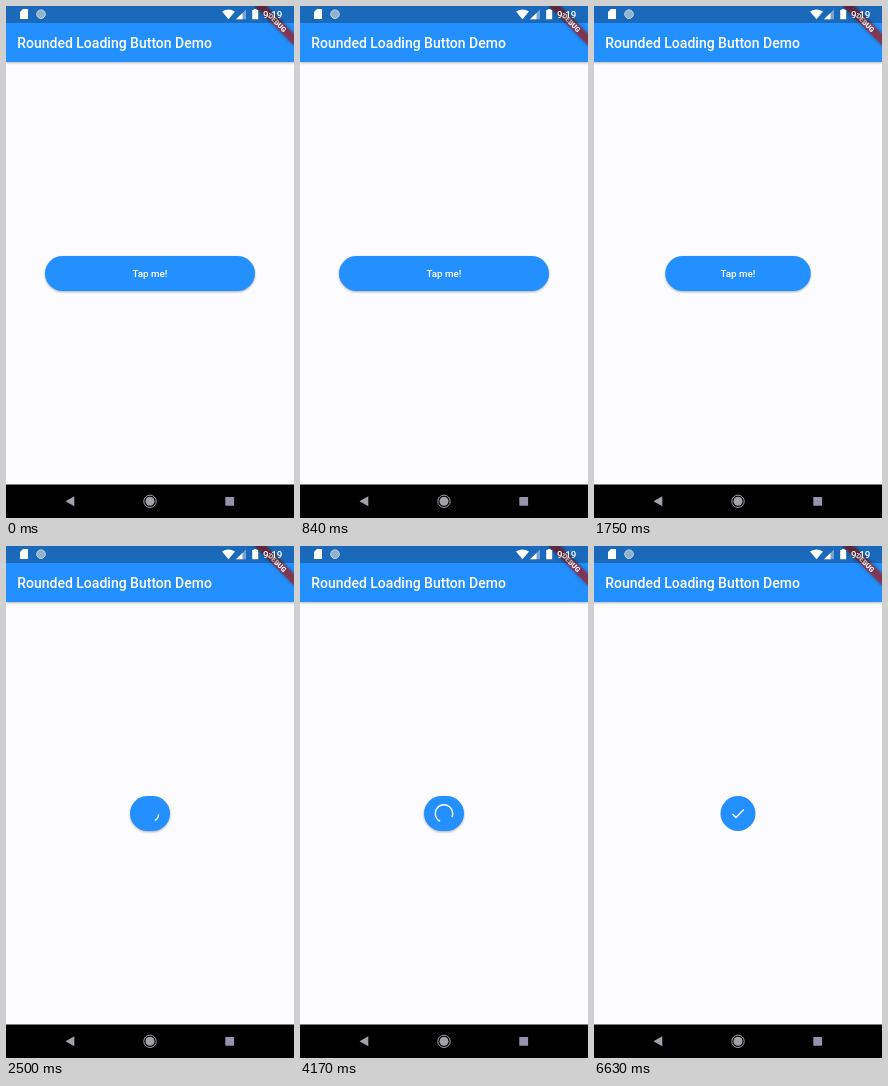
Animation, 288 px wide and 512 px high, one loop 6710 ms. Source, as an HTML page:

```html
<!DOCTYPE html>
<html lang="en">
<head>
<meta charset="utf-8">
<title>Rounded Loading Button Demo</title>
<style>
  html, body { margin: 0; width: 100%; height: 100%; overflow: hidden; background: #fcfcfe; }
  svg { display: block; width: 288px; height: 512px; }
  text { font-family: Roboto, "Noto Sans", sans-serif; font-weight: 500; fill: #fff; }
  .bar { filter: drop-shadow(0 1px 1px rgba(0, 0, 0, .28)); }
  .raised { filter: drop-shadow(0 1px .8px rgba(0, 0, 0, .32)); }
  .ribbon { filter: drop-shadow(0 0 2px rgba(0, 0, 0, .5)); }
</style>
</head>
<body>
<svg viewBox="0 0 288 512">
  <rect width="288" height="512" fill="#fcfcfe"/>

  <rect class="bar" width="288" height="56" fill="#2490ff"/>
  <text x="11.2" y="41.8" font-size="14">Rounded Loading Button Demo</text>

  <!-- corner ribbon -->
  <g transform="translate(288 0) rotate(45)">
    <rect class="ribbon" x="-28" y="19.6" width="56" height="8.4" fill="#b71c1c" fill-opacity=".63"/>
    <text y="26.3" font-size="7.1" style="font-weight:900" text-anchor="middle">DEBUG</text>
  </g>

  <!-- status bar -->
  <rect width="288" height="17" fill="#000" fill-opacity=".27"/>
  <g fill="#fff">
    <path d="M17 3h5v10h-8V6z"/>
    <circle cx="35" cy="8.2" r="4.3" fill="#8fb4cf" stroke="#c3d6e4"/>
    <path d="M216 5.6Q222.500 1.200 229 5.600L222.500 13.300z"/>
    <path d="M240 3.500V13.300H230z" fill-opacity=".4"/>
    <path d="M236.500 7V13.300H230z"/>
    <path d="M247.800 3h2.800v1h1.600v9.300h-6V4h1.600z"/>
  </g>
  <text x="257" y="12.2" font-size="9.8">9:19</text>

  <!-- button -->
  <rect id="pill" y="250" height="35" rx="17.5" fill="#2490ff"/>
  <text id="label" x="144" y="270.9" font-size="9.8" text-anchor="middle">Tap me!</text>
  <path id="arc" fill="none" stroke="#fff" stroke-width="1.4"/>
  <path id="tick" transform="translate(135.6 259.1) scale(.7)" fill="#fff"
        d="M9 16.170L4.830 12l-1.420 1.410L9 19 21 7l-1.410-1.410z"/>

  <!-- navigation bar -->
  <rect y="478.500" width="288" height="33.500" fill="#000"/>
  <path d="M59.500 495.300L68.300 490.300V500.300z" fill="#a5a1ab"/>
  <circle cx="144" cy="495.300" r="6.200" fill="none" stroke="#a5a1ab" stroke-width="1"/>
  <circle cx="144" cy="495.300" r="4.500" fill="#a5a1ab"/>
  <rect x="219.300" y="491" width="8.800" height="8.800" rx=".5" fill="#9793ae"/>
</svg>
<script>
const LOOP = 6710, SQUEEZE = 1528, SPIN = 1732, DONE = 5015;
const CX = 144, CY = 267.5, FULL = 210, SIZE = 35, RADIUS = 8.75;
const [pill, label, arc, tick] = ['pill', 'label', 'arc', 'tick'].map(id => document.getElementById(id));

const clamp = v => Math.min(1, Math.max(0, v));

function bezier(x1, y1, x2, y2) {
  const at = (a, b, s) => 3 * a * s * (1 - s) ** 2 + 3 * b * s * s * (1 - s) + s ** 3;
  return x => {
    x = clamp(x);
    if (x === 0 || x === 1) return x;
    let lo = 0, hi = 1;
    for (let i = 0; i < 24; i++) {
      const mid = (lo + hi) / 2;
      if (at(x1, x2, mid) < x) lo = mid; else hi = mid;
    }
    return at(y1, y2, lo);
  };
}

const inOutCirc = bezier(.785, .135, .15, .86);
const fastOutSlowIn = bezier(.4, 0, .2, 1);
const elasticOut = t => t >= 1 ? 1 : 1 + 2 ** (-10 * t) * Math.sin((t - .1) * 5 * Math.PI);

function spinner(ms) {
  const turn = Math.max(0, ms) / 1000, step = Math.floor(turn) % 5, phase = turn % 1;
  const head = fastOutSlowIn(phase * 2), tail = fastOutSlowIn(phase * 2 - 1);
  const from = Math.PI * (-.5 + tail * 1.5 + phase * 1.7 - step * .8);
  const sweep = Math.max((head - tail) * 1.5 * Math.PI, .001);
  const point = a => `${CX + RADIUS * Math.cos(a)} ${CY + RADIUS * Math.sin(a)}`;
  return `M${point(from)}A${RADIUS} ${RADIUS} 0 ${sweep > Math.PI ? 1 : 0} 1 ${point(from + sweep)}`;
}

function setPill(width, height) {
  pill.setAttribute('x', CX - width / 2);
  pill.setAttribute('y', CY - height / 2);
  pill.setAttribute('width', width);
  pill.setAttribute('height', height);
  pill.setAttribute('rx', Math.min(width, height) / 2);
}

const show = (el, on) => el.style.visibility = on ? 'visible' : 'hidden';

function draw(t) {
  const done = t >= DONE;
  const squeezed = FULL + (SIZE - FULL) * inOutCirc((t - SQUEEZE) / 500);
  const loading = !done && squeezed < 52.5;
  if (done) {
    const size = Math.max(0, SIZE * elasticOut((t - DONE) / 1000));
    setPill(size, Math.min(size, SIZE));
    show(tick, size > 14);
  } else {
    setPill(Math.max(squeezed, 40), SIZE);
    show(tick, false);
  }
  pill.classList.toggle('raised', !done);
  show(label, !done && !loading);
  show(arc, loading);
  if (loading) arc.setAttribute('d', spinner(t - SPIN));
}

const start = performance.now();
function frame() {
  draw((performance.now() - start) % LOOP);
  requestAnimationFrame(frame);
}
frame();
</script>
</body>
</html>
```
